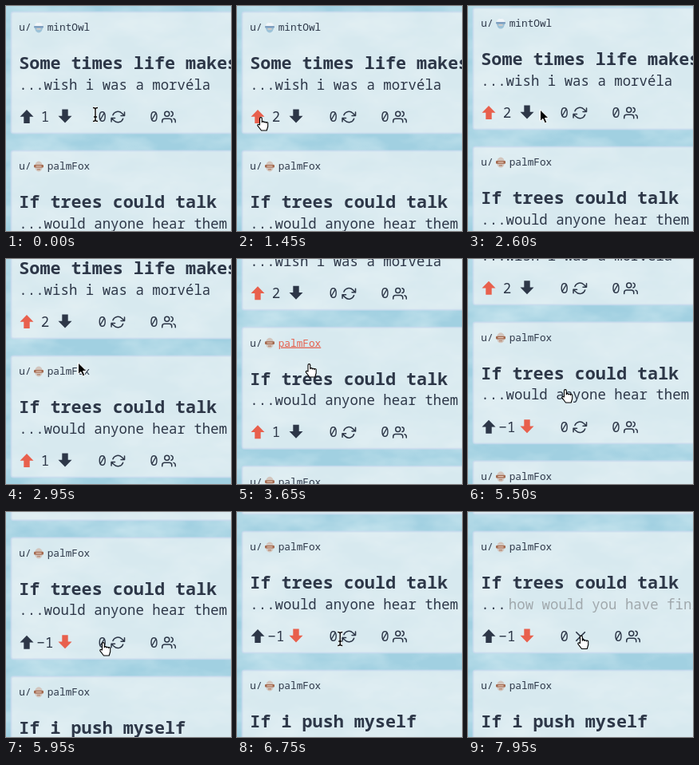
An HTML page that plays this animation: 282 by 282 pixels, repeating every 8 s.

```html
<!DOCTYPE html>
<html lang="en">
<head>
<meta charset="utf-8">
<title>Feed</title>
<style>
html, body { margin: 0; width: 100%; height: 100%; overflow: hidden; background: #a8d4e4; }
svg { position: absolute; left: 0; top: 0; width: 100%; height: 100%; display: block; }
#water { will-change: transform; }
text { font-family: "Noto Sans Mono", "DejaVu Sans Mono", monospace; font-size: 17.4px; fill: #2d3748; white-space: pre; }
.name { font-size: 12.75px; }
.title { font-size: 21.75px; font-weight: 700; }
.count { text-anchor: middle; }
.hint { fill: #a0a8ac; }
.icon { fill: none; stroke: #2d3748; stroke-width: 2; stroke-linecap: round; stroke-linejoin: round; }
.hover { fill: #e5604d; text-decoration: underline; }
.panel { fill: rgba(238, 244, 246, .7); stroke: rgba(203, 219, 238, .7); stroke-width: 2; }
</style>
</head>
<body>
<svg id="water" viewBox="0 0 282 282">
  <filter id="foam" x="0" y="0" width="1" height="1" color-interpolation-filters="sRGB">
    <feTurbulence type="fractalNoise" baseFrequency=".012 .024" numOctaves="4" seed="7"/>
    <feColorMatrix values="0 0 0 0 .92  0 0 0 0 .97  0 0 0 0 .98  1.1 0 0 0 -.4"/>
  </filter>
  <rect width="282" height="282" fill="#a1d0e1"/>
  <rect width="282" height="282" filter="url(#foam)"/>
</svg>
<svg id="stage" viewBox="0 0 282 282">
  <defs>
    <path id="vote" d="M0-8.7L8.5 0H3.7V8.3H-3.7V0H-8.5Z"/>
    <path id="share" d="M23 4v6h-6M1 20v-6h6M3.51 9a9 9 0 0 1 14.85-3.36L23 10M1 14l4.64 4.36A9 9 0 0 0 20.49 15"/>
    <path id="people" d="M17 21v-2a4 4 0 0 0-4-4H5a4 4 0 0 0-4 4v2M5 7a4 4 0 1 0 8 0a4 4 0 1 0-8 0M23 21v-2a4 4 0 0 0-3-3.87M16 3.13a4 4 0 0 1 0 7.75"/>
    <path id="close" d="M18 6L6 18M6 6l12 12"/>
    <path id="bar" d="M-3-8.5Q0-8.5 0-6.5Q0-8.5 3-8.5M0-6.5V6.5M-3 8.5Q0 8.5 0 6.5Q0 8.5 3 8.5M-2 3h4"/>
    <g id="goggles">
      <ellipse rx="5" ry="6.5" fill="#d2c5bd"/>
      <rect x="-6" y="-2" width="12" height="3.6" rx="1" fill="#a3694f"/>
      <rect x="-3.5" y="-.8" width="7" height="1.2" fill="#e6cdbd"/>
      <rect x="-2" y="3" width="4" height="1.5" fill="#b98d78"/>
    </g>
    <g id="cap">
      <ellipse rx="5" ry="6.5" fill="#9dc3d8"/>
      <path d="M-5-2a5 4.5 0 0 1 10 0Z" fill="#f0f5f8"/>
      <rect x="-6" y="-2" width="12" height="2.4" rx="1" fill="#7f9fc0"/>
      <rect x="-2.5" y="1" width="5" height="1.5" fill="#e2cfc4"/>
    </g>
  </defs>
  <g id="feed"></g>
  <g id="cursor" stroke-linejoin="round">
    <path id="arrow" d="M0 0V14.5L3.4 11.4 5.8 16.8 8.4 15.7 6 10.4H10.5Z" stroke="#fff"/>
    <path id="hand" transform="translate(-5 1)" fill="#fff" stroke="#000" stroke-width="1.1"
      d="M3.5 10V2a1.4 1.4 0 0 1 2.8 0V6.8a1.3 1.3 0 0 1 2.6 .2a1.3 1.3 0 0 1 2.5 .5a1.2 1.2 0 0 1 2.3 .7V12L12.2 17H5.5L1 11.2C.2 9.6 1.8 8.8 3.5 10Z"/>
    <g id="beam" fill="none">
      <use href="#bar" stroke="#fff" stroke-width="3"/>
      <use href="#bar" stroke="#000" stroke-width="1.4"/>
    </g>
  </g>
</svg>
<script>
const LOOP = 8000, PITCH = 174;
const DARK = [45, 55, 72], RED = [232, 96, 77];
const $ = id => document.getElementById(id);

const posts = [
  { name: 'mintOwl', face: 'cap', title: 'Some times life makes', sub: '...wish i was a morvéla' },
  { name: 'palmFox', face: 'goggles', title: 'If trees could talk', sub: '...would anyone hear them' },
  { name: 'palmFox', face: 'goggles', title: 'If i push myself', sub: '' }
];

const icon = (id, x, size, cls = '') =>
  `<use href="#${id}" class="icon ${cls}" transform="translate(${x} ${139 - size / 2}) scale(${size / 24})"/>`;
const label = (cls, x, y, text) => `<text class="${cls}" x="${x}" y="${y}">${text}</text>`;

$('feed').innerHTML = posts.map((p, i) => `
  <g class="card" transform="translate(0 ${i * PITCH})">
    <rect class="panel" x="6.5" y="7.5" width="400" height="152" rx="3"/>
    ${label('name', 16.3, 31.2, 'u/')}
    <use href="#${p.face}" x="41" y="27"/>
    ${label('name user', 51.7, 31.2, p.name)}
    ${label('title', 16.3, 79.4, p.title)}
    ${label('sub', 16.3, 104.5, p.sub)}
    <use class="up" href="#vote" transform="translate(26 138.7)"/>
    ${label('count score', 49, 145, 1)}
    <use class="down" href="#vote" transform="translate(74 137.7) scale(1 -1)"/>
    ${label('count', 120.7, 145, 0)}
    ${icon('share', 131.3, 18, 'reply')}
    <g class="group">${label('count', 185.5, 145, 0)}${icon('people', 195, 18)}</g>
  </g>`).join('');

const cards = [...document.querySelectorAll('.card')];
const part = (i, cls) => cards[i].querySelector('.' + cls);

// Reply field that replaces the second post's subtitle
cards[1].insertAdjacentHTML('beforeend', `<g class="field">
  ${label('', 16.3, 104.5, '...')}
  ${label('hint', 50.8, 104.5, 'how would you have finished it?')}
  ${icon('close', 130.6, 21)}</g>`);

const ramp = (t, from, to) => Math.max(0, Math.min(1, (t - from) / (to - from)));
const ease = u => u * u * u * (u * (6 * u - 15) + 10);
const glide = (t, from, to) => ease(ramp(t, from, to));

const scrollAt = t => 70 * glide(t, 2450, 3150) + 30 * glide(t, 3280, 3800) + 57 * glide(t, 5360, 6180);

// The pointer's trips; its look changes halfway through each
const trips = [
  { from: 50, to: 600, x: 30, y: 138, look: 'hand' },
  { from: 2030, to: 2350, x: 90.5, y: 130, look: 'arrow' },
  { from: 3250, to: 3300, x: 90.5, y: 130, look: 'hand' },
  { from: 3680, to: 4300, x: 76, y: 210, look: 'hand' },
  { from: 4930, to: 5150, x: 122, y: 162, look: 'hand' },
  { from: 6300, to: 6350, x: 122, y: 162, look: 'beam' },
  { from: 6530, to: 7050, x: 142, y: 153.5, look: 'hand' }
];

function pointerAt(t) {
  let x = 112, y = 136, look = 'beam';
  for (const trip of trips) {
    const u = glide(t, trip.from, trip.to);
    x += (trip.x - x) * u;
    y += (trip.y - y) * u;
    if (u >= .5) look = trip.look;
  }
  return { x, y, look };
}

const tint = (node, u) => node.setAttribute('fill',
  `rgb(${DARK.map((v, k) => Math.round(v + (RED[k] - v) * u))})`);

function draw(t) {
  $('feed').setAttribute('transform', `translate(0 ${-scrollAt(t)})`);

  const voted = ramp(t, 1050, 1250), turned = ramp(t, 4430, 4650);
  tint(part(0, 'up'), voted);
  tint(part(1, 'up'), 1 - turned);
  tint(part(1, 'down'), turned);
  part(0, 'score').textContent = t < 1100 ? '1' : '2';
  part(1, 'score').textContent = t < 4450 ? '1' : '−1';
  part(1, 'user').classList.toggle('hover', t >= 3300 && t < 3750);

  const open = ramp(t, 7720, 7870);
  part(1, 'field').style.opacity = open;
  part(1, 'sub').style.opacity = part(1, 'reply').style.opacity = 1 - open;
  part(1, 'group').setAttribute('transform', `translate(${t < 7750 ? 0 : 3} 0)`);

  const { x, y, look } = pointerAt(t);
  $('cursor').setAttribute('transform', `translate(${x} ${y})`);
  for (const id of ['arrow', 'hand', 'beam']) $(id).style.display = id === look ? '' : 'none';
}

for (const i of cards.keys()) for (const cls of ['up', 'down']) tint(part(i, cls), 0);

const start = performance.now();
function tick() {
  draw((performance.now() - start) % LOOP);
  requestAnimationFrame(tick);
}
tick();
</script>
</body>
</html>
```
